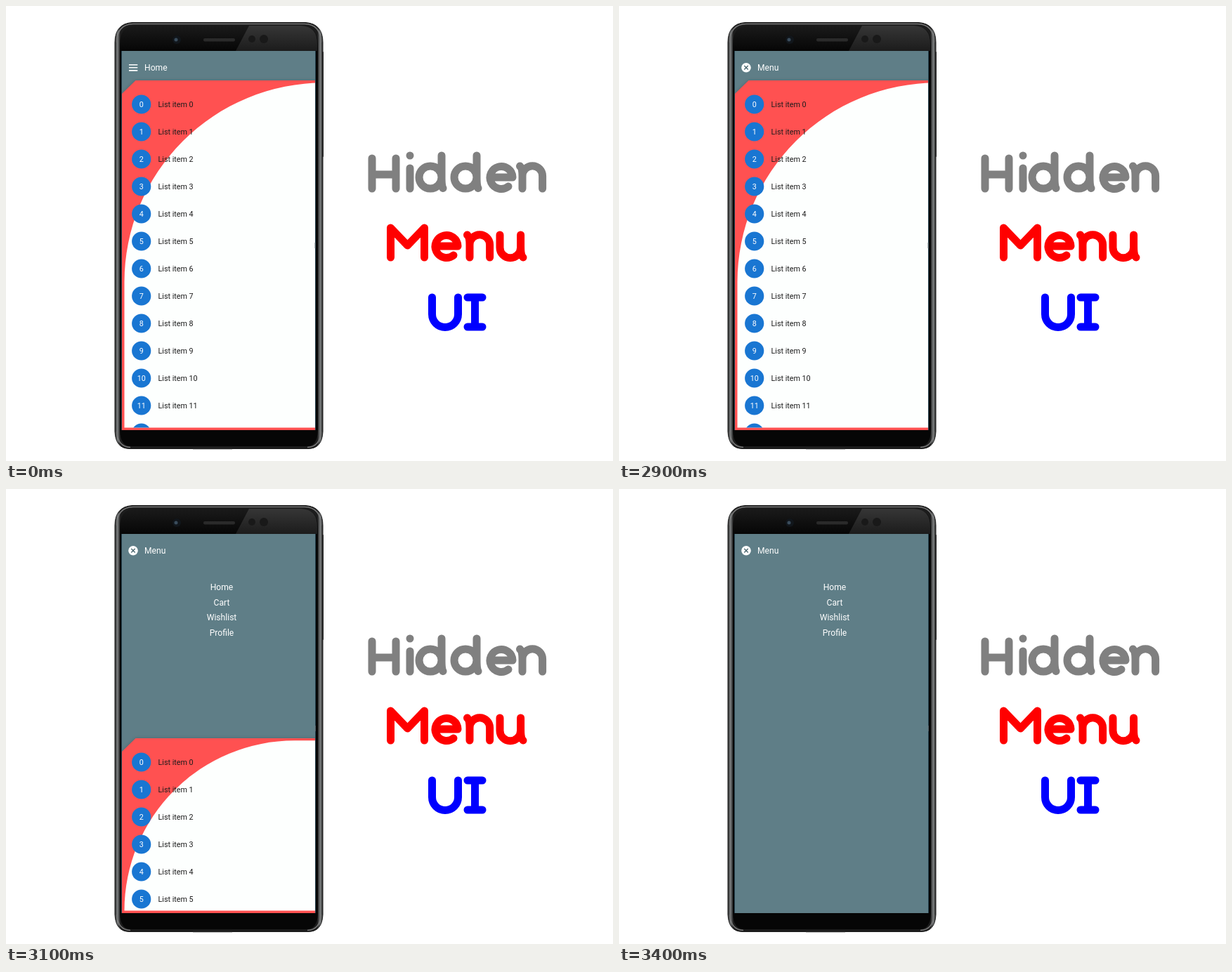
These frames come from a looping animation (864x648 px, 5.1 s). An HTML page:

```html
<!DOCTYPE html>
<html lang="en">
<head>
<meta charset="utf-8">
<title>Hidden Menu UI</title>
<style>
html, body { margin: 0; height: 100%; overflow: hidden; background: #fff; }
svg { display: block; width: 864px; height: 648px; font-family: Roboto, sans-serif; }
.bar { font-size: 12.1px; fill: #fff; }
.mid { text-anchor: middle; }
#list { font-size: 10.75px; fill: #1c1c1c; }
#list .num { fill: #fff; }
.letters { fill: none; stroke-width: 11; stroke-linecap: round; stroke-linejoin: round; }
#sheet { filter: drop-shadow(0 0 2px rgba(0, 0, 0, .2)); }
</style>
</head>
<body>
<svg viewBox="0 0 864 648">
  <defs>
    <linearGradient id="rim">
      <stop offset="0" stop-color="#222"/>
      <stop offset=".012" stop-color="#7c7f80"/>
      <stop offset=".026" stop-color="#1c1c1c"/>
      <stop offset=".974" stop-color="#1c1c1c"/>
      <stop offset=".988" stop-color="#7c7f80"/>
      <stop offset="1" stop-color="#222"/>
    </linearGradient>
    <linearGradient id="glass" x1="0" y1="28" x2="0" y2="64" gradientUnits="userSpaceOnUse">
      <stop offset="0" stop-color="#1a1a1a"/>
      <stop offset="1" stop-color="#060606"/>
    </linearGradient>
    <linearGradient id="gloss" x1="0" y1="0" x2="0" y2="1">
      <stop offset="0" stop-color="#363636"/>
      <stop offset="1" stop-color="#1c1c1c"/>
    </linearGradient>
    <clipPath id="screen"><rect x="165" y="64" width="275" height="540"/></clipPath>
    <clipPath id="listArea"><rect x="165" y="64" width="275" height="536.5"/></clipPath>
  </defs>

  <!-- phone -->
  <rect x="449" y="65" width="3" height="150" rx="1" fill="#333"/>
  <path d="M180 23.500H426Q451 25 451 52V606Q450 630.500 430 630.500H176Q156 630.500 155 606V52Q155 25 180 23.500Z" fill="url(#rim)" stroke="#1a1a1a"/>
  <path d="M158 52Q158 26 181 25.500H425Q448 26 448 52M158 606Q159 628 177 628.500M448 606Q447 628 429 628.500" fill="none" stroke="#777" stroke-width="1.500"/>
  <path d="M184 28H421Q444 29 444 54V605Q443 627 428 627H178Q163 627 162 605V54Q162 29 184 28Z" fill="url(#glass)"/>
  <path d="M327 64L346 28H420Q443 29 443 54V64Z" fill="url(#gloss)"/>
  <rect x="281" y="46" width="45" height="4.500" rx="2" fill="#2a2a2a"/>
  <circle cx="243" cy="48" r="6" fill="#11161b"/>
  <circle cx="242" cy="48" r="2.500" fill="#3a4c5c"/>
  <circle cx="350" cy="47" r="5" fill="#191919"/>
  <circle cx="367" cy="47" r="6" fill="#191919"/>
  <path d="M266 630H322" stroke="#222" stroke-width="2.500"/>
  <path d="M164.500 64V604M440.500 64V604" stroke="#24404d"/>

  <!-- app -->
  <g clip-path="url(#screen)">
    <rect x="165" y="64" width="275" height="540" fill="#5f7e87"/>
    <path id="burger" d="M175 83.700H187.300M175 87.800H187.300M175 91.900H187.300" stroke="#fff" stroke-width="1.600"/>
    <g id="close">
      <circle cx="181" cy="87.800" r="6.800" fill="#fff"/>
      <path d="M178.300 85.100l5.400 5.400m0-5.400l-5.400 5.400" stroke="#4c6870" stroke-width="1.400"/>
    </g>
    <text id="title" class="bar" x="197" y="92"></text>
    <g id="menu" class="bar mid"></g>
    <g id="sheet">
      <path id="back" fill="#ff5151"/>
      <path id="front" fill="#fdfffe"/>
      <g clip-path="url(#listArea)"><g id="list"></g></g>
    </g>
  </g>
  <rect x="439.500" y="337" width="1" height="8" fill="#707a80"/>

  <!-- lettering -->
  <g class="letters" role="img" aria-label="Hidden Menu UI">
    <path id="hidden" stroke="#808080"/>
    <path id="menuWord" stroke="#f00"/>
    <path id="ui" stroke="#00f"/>
  </g>
</svg>
<script>
const $ = id => document.getElementById(id);
const LOOP = 5100, OPEN = 2900, TOP = 106, BOTTOM = 604;
const STEPS = [0, .4, .5, .6, .7, 1];

$('menu').innerHTML = ['Home', 'Cart', 'Wishlist', 'Profile']
  .map((s, i) => `<text x="307" y="${144.2 + i * 21.55}">${s}</text>`).join('');

$('list').innerHTML = Array.from({ length: 13 }, (_, i) => {
  const y = 34 + i * 39;
  return `<circle cx="192.700" cy="${y}" r="13.600" fill="#1976d2"/>
    <text class="num mid" x="192.700" y="${y + 3.8}">${i}</text>
    <text x="216.500" y="${y + 3.8}">List item ${i}</text>`;
}).join('');

// Letter strokes, placed by bowl centre or left stem
const d = (x, y) => `M${x + 16} ${y - 31}V${y}A16 16 0 1 1 ${x} ${y - 16}A16 16 0 0 1 ${x + 16} ${y}Q${x + 16} ${y + 12} ${x + 18} ${y + 15.5}`;
const e = (x, y) => `M${x - 16} ${y}H${x + 16}A16 16 0 1 0 ${x + 10} ${y + 13}`;
const n = (x, y) => `M${x - 3.5} ${y - 16}Q${x} ${y - 13} ${x} ${y - 2}V${y + 16}M${x} ${y - 2}A14.3 14.3 0 0 1 ${x + 28.6} ${y - 2}V${y + 16}`;
const u = (x, y) => `M${x} ${y - 16}V${y + 2}A14.8 14.8 0 0 0 ${x + 29.6} ${y + 2}V${y - 16}M${x + 29.6} ${y}Q${x + 29.6} ${y + 13} ${x + 33} ${y + 16}`;

$('hidden').setAttribute('d', 'M521 217V260M555 217V260M521 240H555M575 213V213.100M575 231V260'
  + d(604, 244) + d(654, 244) + e(705, 244) + n(735, 244));
$('menuWord').setAttribute('d', 'M547.500 358V316L571.500 341L595.500 316V358'
  + e(627, 342) + n(660, 342) + u(703, 342));
$('ui').setAttribute('d', 'M606.500 415V439A18.500 18.500 0 0 0 643.500 439V415M657 415H678M667.500 415V457M657 457H678');

function setSheet(p) {
  const top = TOP + p * (BOTTOM - TOP), y = top + 3.3, end = 600.5;
  $('sheet').style.display = p < 1 ? '' : 'none';
  if (p >= 1) return;
  const r = Math.min(284, end - y);
  $('back').setAttribute('d', `M184.500 ${top}H460V${BOTTOM}H165V${top + 19}Z`);
  $('front').setAttribute('d', `M168.500 ${end}V${y + r}A${r} ${r} 0 0 1 ${168.5 + r} ${y}H460V${end}Z`);
  $('list').setAttribute('transform', `translate(0 ${top})`);
}

const start = performance.now();
function draw() {
  const t = (performance.now() - start) % LOOP;
  const open = t >= OPEN;
  const step = open ? Math.min(STEPS.length - 1, Math.floor((t - OPEN) / 100)) : 0;
  $('title').textContent = open ? 'Menu' : 'Home';
  $('burger').style.display = open ? 'none' : '';
  $('close').style.display = open ? '' : 'none';
  setSheet(STEPS[step]);
  requestAnimationFrame(draw);
}
draw();
</script>
</body>
</html>
```
